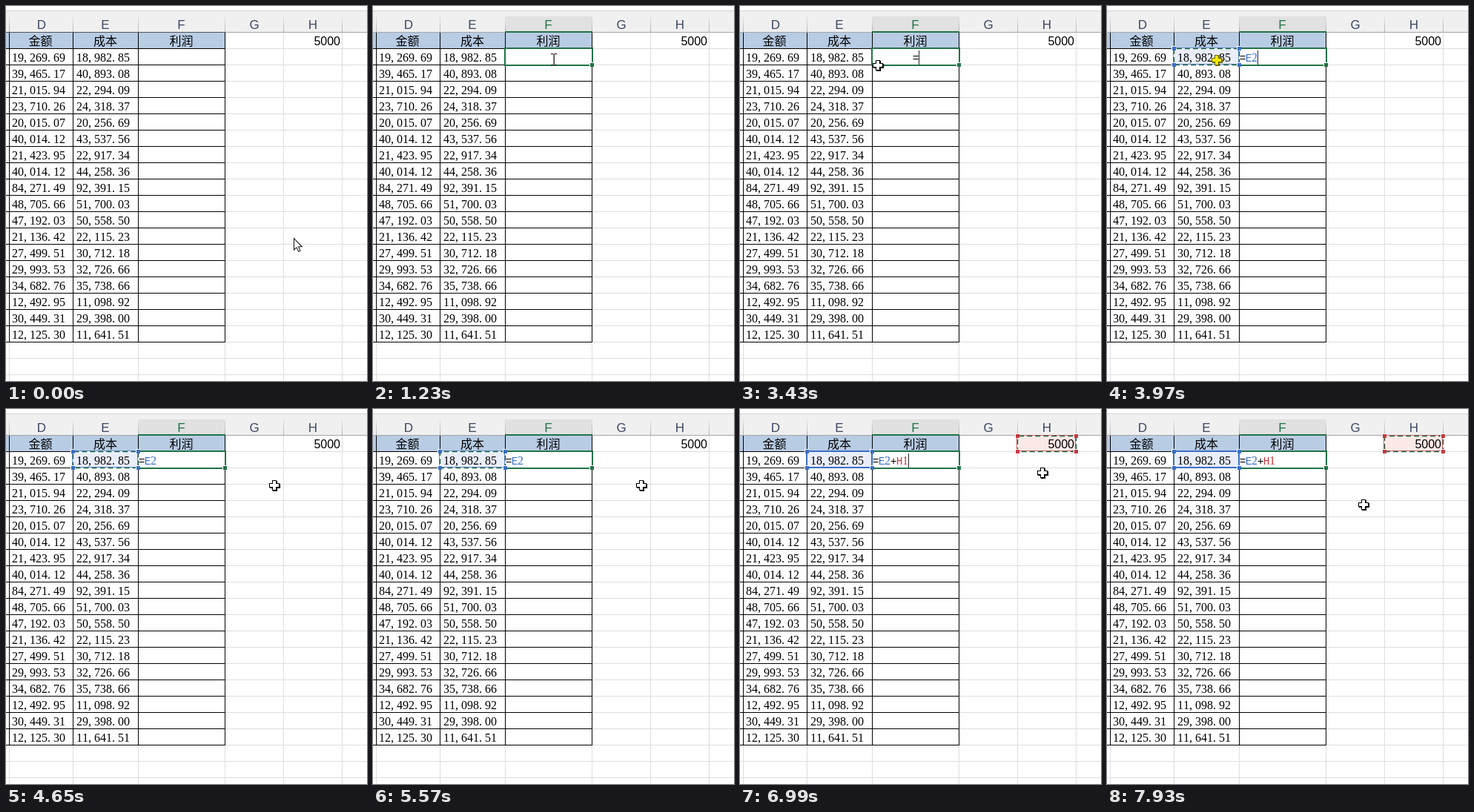
These frames come from a looping animation (487 px wide and 506 px high, 7.99 s). An HTML page with a canvas:

```html
<!DOCTYPE html>
<html lang="zh">
<head>
<meta charset="utf-8">
<title>Spreadsheet formula entry</title>
<style>
html, body { margin: 0; width: 100%; height: 100%; overflow: hidden; background: #fff; }
canvas { display: block; }
</style>
</head>
<body>
<canvas id="stage" width="487" height="506"></canvas>
<script>
const W = 487, H = 506, LOOP = 7990;
const ctx = document.getElementById('stage').getContext('2d');

const COLS = [4, 90, 178, 295, 374, 453];
const TOP = 57, STEP = 22;
const GREEN = '#217346', BLUE = '#3a6fc4', RED = '#c43a40';
const SERIF = '16px "Liberation Serif", serif';
const MONO = '14.5px "Liberation Mono", monospace';
const SANS = '"Liberation Sans", sans-serif';
const HAN = '300 16px "Noto Sans CJK SC", "Noto Sans CJK", sans-serif';

// Cell text: amount and cost per row
const CELLS = `19,269.69 18,982.85
39,465.17 40,893.08
21,015.94 22,294.09
23,710.26 24,318.37
20,015.07 20,256.69
40,014.12 43,537.56
21,423.95 22,917.34
40,014.12 44,258.36
84,271.49 92,391.15
48,705.66 51,700.03
47,192.03 50,558.50
21,136.42 22,115.23
27,499.51 30,712.18
29,993.53 32,726.66
34,682.76 35,738.66
12,492.95 11,098.92
30,449.31 29,398.00
12,125.30 11,641.51`.split('\n').map(row => row.split(' '));
const BOTTOM = TOP + STEP * CELLS.length;

// Key moments in ms
const SELECT = 690, EDIT = 1030, LEAVE = 1980, EQUALS = 2910;
const PICK_COST = 3850, PLUS = 5650, PICK_FEE = 6860;
const FLASH = 130, BLINK = 1080, FIRST_BLINK = 1630;

// Pointer moves: begin, end, destination
const MOVES = [
  [60, 130, 325, 175],
  [270, 550, 245, 58],
  [SELECT - 1, SELECT, 233, 71],
  [EDIT, 1210, 244, 72],
  [1680, 2220, 242, 91],
  [3030, 3740, 148, 73],
  [3990, 4540, 362, 103],
  [5800, 6530, 432, 51],
  [6880, 6990, 408, 86],
  [6990, 7500, 346, 129]
];

const within = (t, a, b) => t >= a && t < b;

function rect(x, y, w, h, color) {
  ctx.fillStyle = color;
  ctx.fillRect(x, y, w, h);
}

const hline = (x, y, x2, color) => rect(x, y, x2 - x, 1, color);
const vline = (x, y, y2, color) => rect(x, y, 1, y2 - y, color);

function frame(x, y, w, h, color, width) {
  ctx.strokeStyle = color;
  ctx.lineWidth = width;
  ctx.strokeRect(x, y, w, h);
}

function text(s, x, y, font, color, align = 'center') {
  ctx.font = font;
  ctx.fillStyle = color;
  ctx.textAlign = align;
  ctx.fillText(s, x, y);
}

// Fixed 8 px pitch
function gridText(s, x, y, color = '#000') {
  [...s].forEach((ch, i) => {
    if (/[\d.,]/.test(ch)) text(ch, x + 8 * i, y, SERIF, color, 'left');
    else text(ch, x + 8 * i + 4, y, MONO, color);
  });
}

function drawSheet(selected) {
  rect(0, 0, W, H, '#fff');
  rect(0, 6, W, 29, '#f0f0f0');
  hline(0, 6, W, '#d4d4d4');
  const fade = ctx.createLinearGradient(0, 14, 0, 35);
  fade.addColorStop(0, '#e6e6e6');
  fade.addColorStop(1, '#b0b0b0');
  for (const x of COLS) {
    vline(x, 14, 35, fade);
    vline(x, 36, H, '#dedede');
  }
  for (let y = TOP; y < H; y += STEP) hline(0, y, W, '#dedede');
  hline(0, 35, W, '#a6a6a6');

  if (selected) {
    rect(179, 14, 116, 20, '#e1e1e1');
    rect(178, 34, 118, 2, GREEN);
  }
  [48, 134, 236.5, 335, 414].forEach((x, i) =>
    text('DEFGH'[i], x, 31, '17px ' + SANS, selected && i === 2 ? GREEN : '#3c4863'));

  rect(0, 36, 295, 21, '#b8cce4');
  for (let y = TOP; y <= BOTTOM; y += STEP) hline(0, y, 296, '#000');
  for (const x of COLS.slice(0, 4)) vline(x, 36, BOTTOM + 1, '#000');
  if (!selected) hline(0, 35, 296, '#555');
}

function drawValues() {
  text('金额', 46.5, 53, HAN, '#000');
  text('成本', 134, 53, HAN, '#000');
  text('利润', 236.5, 53, HAN, '#000');
  CELLS.forEach(([amount, cost], i) => {
    const y = TOP + 18 + STEP * i;
    gridText(amount, 8, y);
    gridText(cost, 95, y);
  });
  text('5000', 451, 52.5, '16px ' + SANS, '#000', 'right');
}

function drawActiveCell() {
  frame(178, 57, 118, 23, GREEN, 2);
  rect(292, 76, 6, 6, '#fff');
  rect(293, 77, 5, 5, GREEN);
}

// Referenced cell: solid outline, with marching dashes while it is being picked
function drawReference(x, y, w, h, color, picking, t) {
  frame(x, y, w, h, color, 2);
  if (picking) {
    const edge = [x + 0.5, y + 0.5, w, h];
    frame(...edge, '#fff', 1.4);
    ctx.setLineDash([7, 4]);
    ctx.lineDashOffset = -t / 35;
    frame(...edge, '#1f6441', 1.4);
    ctx.setLineDash([]);
  }
  for (const cx of [x, x + w])
    for (const cy of [y, y + h]) {
      rect(cx - 3, cy - 3, 6, 6, '#fff');
      rect(cx - 2, cy - 2, 5, 5, color);
    }
}

function caretOn(t) {
  const edits = [FIRST_BLINK, EQUALS, PICK_COST, PLUS, PICK_FEE].filter(e => e <= t);
  return edits.length > 0 && (t - edits.pop()) % BLINK < BLINK / 2;
}

function drawFormula(t) {
  const parts = [[EQUALS, '=', '#000'], [PICK_COST, 'E2', BLUE], [PLUS, '+', '#000'], [PICK_FEE, 'H1', RED]];
  // Centred until the first reference, then aligned left
  let x = t < EQUALS ? 237 : t < PICK_COST ? 233 : 179;
  for (const [at, s, color] of parts) {
    if (t < at) break;
    gridText(s, x, 75, color);
    x += 8 * s.length;
  }
  if (caretOn(t)) vline(x, 60, 79, '#222');
}

function polygon(points, fill, stroke) {
  ctx.beginPath();
  points.forEach(([x, y]) => ctx.lineTo(x, y));
  ctx.closePath();
  ctx.fillStyle = fill;
  ctx.fill();
  ctx.strokeStyle = stroke;
  ctx.lineWidth = 1.1;
  ctx.stroke();
}

function arrow() {
  polygon([[0.5, 0.5], [0.5, 16], [4, 12.8], [6.6, 18.4], [9, 17.4], [6.5, 11.8], [11.3, 11.8]],
    '#fff', '#222');
}

function cross(lit) {
  const a = 2.5, b = 6.5, plus = [];
  // One arm corner, turned through four quarters
  for (let q = 0; q < 4; q++)
    for (const [x, y] of [[-a, -b], [a, -b], [a, -a]]) {
      const c = [1, 0, -1, 0][q], s = [0, 1, 0, -1][q];
      plus.push([x * c - y * s, x * s + y * c]);
    }
  const edge = lit ? '#706a00' : '#000';
  polygon(plus.map(([x, y]) => [x + 1, y + 1]), edge, edge);
  polygon(plus, lit ? '#f0e800' : '#fff', edge);
}

function beam() {
  rect(-0.5, -7, 1.4, 14, '#222');
  for (const y of [-8, 7]) {
    rect(-4, y, 3.5, 1.2, '#222');
    rect(0.8, y, 3.5, 1.2, '#222');
  }
}

function pointerAt(t) {
  let x = 388, y = 313;
  for (const [begin, end, toX, toY] of MOVES) {
    const u = Math.min(1, Math.max(0, (t - begin) / (end - begin)));
    const e = u * u * (3 - 2 * u);
    x += (toX - x) * e;
    y += (toY - y) * e;
  }
  return [Math.round(x), Math.round(y)];
}

function drawPointer(t) {
  const clicks = [SELECT, PICK_COST, PICK_FEE - 70];
  ctx.save();
  ctx.translate(...pointerAt(t));
  if (t < SELECT) arrow();
  else if (within(t, EDIT, LEAVE)) beam();
  else cross(clicks.some(c => within(t, c, c + FLASH)));
  ctx.restore();
}

function draw(t) {
  const selected = t >= SELECT, costPicked = t >= PICK_COST, feePicked = t >= PICK_FEE;
  drawSheet(selected);
  if (costPicked) rect(91, 58, 87, 21, '#e9eefa');
  if (feePicked) rect(375, 36, 78, 21, '#fbe9e7');
  drawValues();
  if (selected) drawActiveCell();
  if (costPicked) drawReference(90, 57, 88, 22, BLUE, t < PLUS, t);
  if (feePicked) drawReference(374, 36, 79, 21, RED, true, t);
  drawFormula(t);
  drawPointer(t);
}

const start = performance.now();
function tick() {
  draw((performance.now() - start) % LOOP);
  requestAnimationFrame(tick);
}
tick();
</script>
</body>
</html>
```
